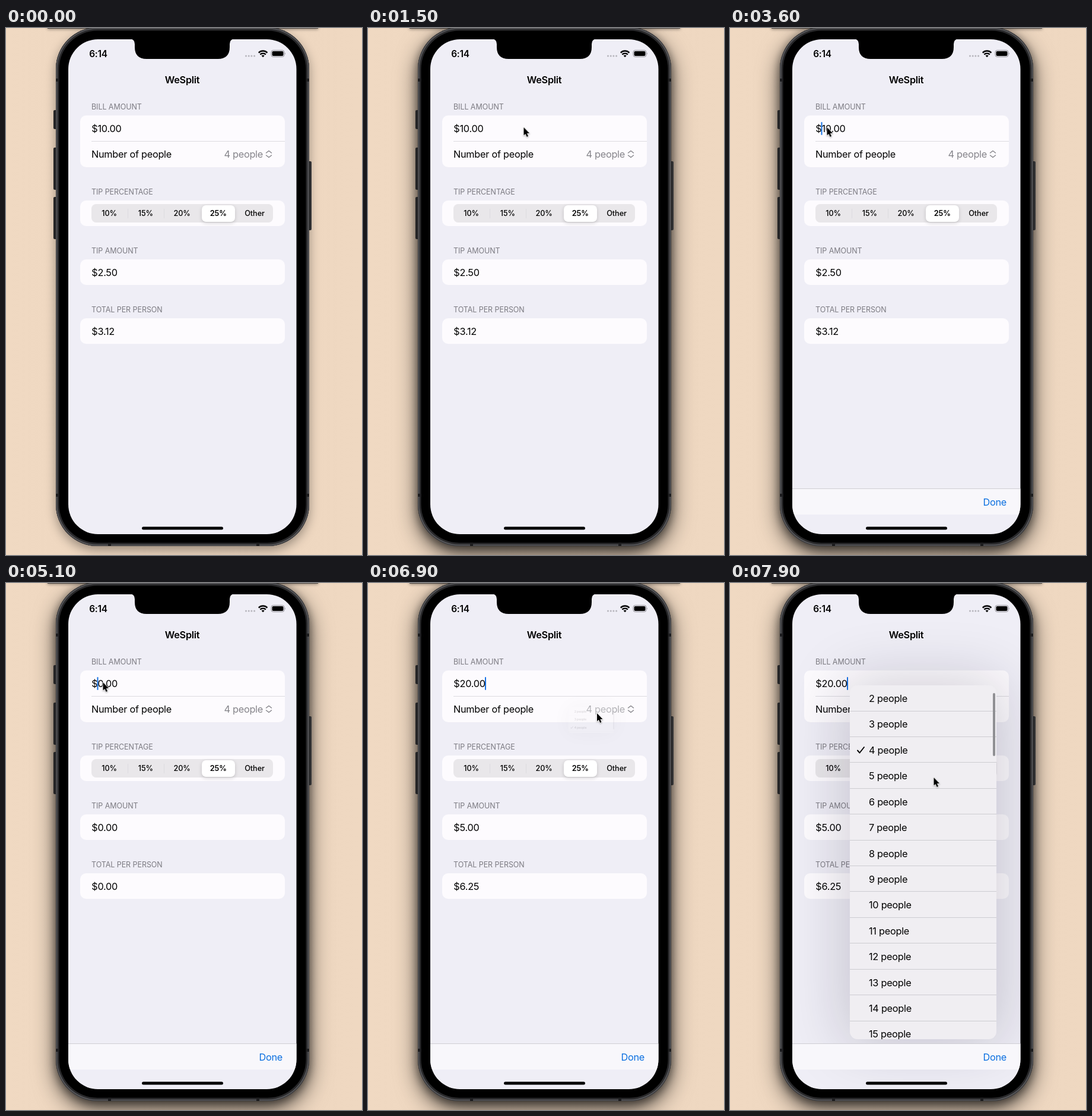
Animation, 600 px wide and 886 px high, one loop 8000 ms. Source, as an HTML page:

```html
<!DOCTYPE html>
<html lang="en">
<head>
<meta charset="utf-8">
<title>WeSplit</title>
<style>
  html, body { margin: 0; width: 100%; height: 100%; overflow: hidden; }
  #stage {
    position: relative; width: 600px; height: 886px; overflow: hidden;
    background: linear-gradient(90deg, #f0d9c2, #edd6bf 50%, #efd8c1);
    font-family: Inter, sans-serif; color: #000;
  }
  #stage div, #stage svg { position: absolute; box-sizing: border-box; }
  #stage .text { white-space: pre; line-height: 20px; letter-spacing: -.0165em; }
  .bar { background: #4e4a47; box-shadow: 0 1px 5px rgba(0, 0, 0, .45); }
  .shade { border-radius: 70px; }
  .soft { box-shadow: 0 7px 18px rgba(0, 0, 0, .36); }
  .deep { box-shadow: 0 14px 38px rgba(0, 0, 0, .6), 0 2px 14px rgba(0, 0, 0, .25); }
  .button { background: linear-gradient(90deg, #1c1c1d, #38383a); border-radius: 2px; }
  .frame {
    border-radius: 70px; background: #000;
    box-shadow: inset 0 0 0 1px #38383a, inset 0 0 0 2.5px #5b5b5e, inset 0 0 0 5.5px #29292b;
  }
  .antenna { background: #1d1d1f; }
  #screen { inset: 0; background: #efeef6; clip-path: inset(19px 110.5px 35px 105px round 50px); }
  .card { background: #fdfbfe; border-radius: 10px; }
  .line { background: #dcdbe0; }
  .segments { background: #e9e7ea; border-radius: 8px; }
  .picked { background: #fff; border-radius: 7px; box-shadow: 0 2px 6px rgba(0, 0, 0, .16), 0 1px 1px rgba(0, 0, 0, .06); }
  .caret { background: #1672e4; border-radius: 1px; }
  .menu {
    overflow: hidden; border-radius: 13px; background: #f0eef2; transform-origin: 0 0;
    box-shadow: 0 0 100px 10px rgba(20, 18, 45, .19);
  }
  .rule { background: #cdccd1; }
  .scroll { background: #909094; border-radius: 2px; }
  .toolbar { background: #f8f7fb; border-top: 1px solid #cfced4; }
</style>
</head>
<body>
<div id="stage">
  <div id="back" style="inset:0"></div>
  <div id="screen"></div>
  <svg width="600" height="886" viewBox="0 0 600 886">
    <path d="M209 18H385Q377 19 377 27V32Q377 52 357 52H237Q217 52 217 32V27Q217 19 209 18Z"/>
    <g fill="#b6b5bc">
      <circle cx="404.500" cy="47" r="1.500"/><circle cx="409.200" cy="47" r="1.500"/>
      <circle cx="413.900" cy="47" r="1.500"/><circle cx="418.600" cy="47" r="1.500"/>
    </g>
    <g fill="none" stroke="#000" stroke-width="2.400">
      <path d="M425.800 41.600A10.200 10.200 0 0 1 440.400 41.600"/>
      <path d="M428.400 44.600A6.600 6.600 0 0 1 437.800 44.600"/>
    </g>
    <path d="M433.100 49.200L430.600 46.600A3.600 3.600 0 0 1 435.600 46.600Z"/>
    <rect x="447" y="37.500" width="22" height="11" rx="3.300" fill="none" stroke="#8f8e95"/>
    <rect x="448.500" y="39" width="19" height="8" rx="2"/>
    <path d="M470 41.300Q471.800 43 470 44.700Z" fill="#8f8e95"/>
    <rect x="229" y="838.500" width="137" height="5" rx="2.500"/>
  </svg>
  <svg id="cursor" width="16" height="22" viewBox="-2 -2 16 22" style="left:-2px;top:-2px;overflow:visible;filter:drop-shadow(0 1px 1px rgba(0,0,0,.3))">
    <path d="M0 0V13.600L3 10.900L5.200 15.900L7.500 14.900L5.400 10.100H9.600Z" stroke="#fff" stroke-width="1.600" paint-order="stroke" stroke-linejoin="round"/>
  </svg>
</div>
<script>
const LOOP = 8000;
const back = document.getElementById('back');
const screen = document.getElementById('screen');
const cursor = document.getElementById('cursor');

function box(parent, cls, x, y, w, h) {
  const el = document.createElement('div');
  el.className = cls;
  Object.assign(el.style, { left: x + 'px', top: y + 'px', width: w + 'px', height: h + 'px' });
  parent.append(el);
  return el;
}

// y is the middle of the capitals; align is 0, .5 or 1
function text(parent, str, x, y, { size = 16.3, align = 0, ...style } = {}) {
  const el = document.createElement('div');
  el.className = 'text';
  el.textContent = str;
  Object.assign(el.style, {
    left: x + 'px', top: y - 10 + 'px', fontSize: size + 'px', translate: -100 * align + '%', ...style
  });
  parent.append(el);
  return el;
}

function svg(parent, x, y, w, h, d, color, width) {
  parent.insertAdjacentHTML('beforeend',
    `<svg style="left:${x}px;top:${y}px" width="${w}" height="${h}" fill="none" stroke="${color}"
      stroke-width="${width}" stroke-linecap="round" stroke-linejoin="round"><path d="${d}"/></svg>`);
  return parent.lastElementChild;
}

// steps: [time, properties, easing to the next step]
function track(el, steps) {
  const frames = steps.map(([t, props, easing = 'linear']) => ({ ...props, easing, offset: t / LOOP }));
  if (frames[0].offset > 0) frames.unshift({ ...frames[0], offset: 0, easing: 'step-end' });
  if (frames.at(-1).offset < 1) frames.push({ ...frames.at(-1), offset: 1 });
  el.animate(frames, { duration: LOOP, iterations: Infinity });
}

const fade = (el, steps, easing) => track(el, steps.map(([t, opacity]) => [t, { opacity }, easing]));
const HOLD = 'step-end';
const FOCUS = 1500, TAP = 2090, ERASE = 4900, TYPE = 5500, OPEN = 6900;

// Device
box(back, 'bar', 70, -10, 456, 11);
box(back, 'shade soft', 84, -1, 427, 872);
fade(box(back, 'shade deep', 84, -1, 427, 872), [[0, 0], [FOCUS, 1]], HOLD);
for (const [x, y, h] of [[80, 138, 32], [80, 201, 71], [80, 284, 71], [509, 224, 116]])
  box(back, 'button', x, y, 5.5, h);
box(back, 'frame', 84, -1, 427, 872);
for (const y of [85, 783]) for (const x of [84, 505.5]) box(back, 'antenna', x, y, 5.5, 5);
box(back, 'antenna', 172, 865, 5, 5.5);
box(back, 'antenna', 422, 865, 5, 5.5);

// Form
text(screen, '6:14', 155.5, 43.5, { size: 15.4, align: .5, fontWeight: 600 });
text(screen, 'WeSplit', 297, 87, { align: .5, fontWeight: 600 });
for (const [title, y, h] of [
  ['BILL AMOUNT', 133, 86.5], ['TIP PERCENTAGE', 275.5, 43],
  ['TIP AMOUNT', 374.5, 43], ['TOTAL PER PERSON', 473.5, 43]
]) {
  text(screen, title, 144, y, { size: 12.5, color: '#7c7b82', letterSpacing: '-.005em' });
  box(screen, 'card', 124.5, y + 14, 345, h);
}
box(screen, 'line', 144, 189.5, 325.5, 1);
text(screen, 'Number of people', 144, 212);
const count = text(screen, '4 people', 433, 212, { align: 1, color: '#85848a' });
fade(count, [[0, 1], [6800, 1], [OPEN, .65], [7100, .4]]);
svg(screen, 437, 205, 12, 14, 'M1.500 5L6 1.500L10.500 5M1.500 9L6 12.500L10.500 9', '#85848a', 1.4);

box(screen, 'segments', 144, 296, 306, 31);
box(screen, 'line', 204.5, 303.5, 1, 16);
box(screen, 'line', 265.5, 303.5, 1, 16);
box(screen, 'picked', 330, 297.5, 56, 28);
['10%', '15%', '20%', '25%', 'Other'].forEach((label, i) =>
  text(screen, label, 174.2 + i * 61.2, 312, { size: 12.7, align: .5, fontWeight: i === 3 ? 600 : 500, letterSpacing: '-.005em' }));

for (const [y, ...values] of [
  [169, '$10.00', '$0.00', '$20.00'],
  [410.5, '$2.50', '$0.00', '$5.00'],
  [509.5, '$3.12', '$0.00', '$6.25']
]) values.forEach((value, i) =>
  fade(text(screen, value, 144.3, y), [0, ERASE, TYPE].map((t, k) => [t, +(k === i)]), HOLD));

const caret = box(screen, 'caret', 0, 158, 2, 21.5);
track(caret, [[0, 194.5], [3150, 153.5], [TYPE, 197]].map(([t, x]) => [t, { transform: `translateX(${x}px)` }, HOLD]));
const blinks = [2650, 3900, 5950, 7050].flatMap(t => [[t, 1], [t + 100, 0], [t + 450, 0], [t + 550, 1]]);
fade(caret, [[0, 0], [TAP - 1, 0], [TAP, 1], ...blinks]);

// Pop-up list
const menu = box(screen, 'menu', 201.5, 172, 247, 595);
for (let n = 2, y = 22; n <= 15; n++, y += 43.42) {
  text(menu, n + ' people', 32, y);
  box(menu, 'rule', 0, y + 20.5, 247, 1);
}
svg(menu, 11, 102, 16, 14, 'M2 7.500L5.500 11.500L13 2', '#000', 1.9);
box(menu, 'scroll', 241, 13, 3.5, 106);
const spring = 'cubic-bezier(.25,.8,.3,1)';
track(menu, [
  [0, { transform: 'translate(136.5px,37px) scale(.31)', height: '135px' }, HOLD],
  [OPEN, { transform: 'translate(136.5px,37px) scale(.31)', height: '135px' }, spring],
  [7400, { transform: 'none', height: '595px' }]
]);
fade(menu, [[0, 0], [OPEN - 1, 0], [OPEN, .16], [7130, 1]]);

const toolbar = box(screen, 'toolbar', 105, 774, 385, 44);
text(toolbar, 'Done', 361, 22, { align: 1, color: '#0a6fe0' });
track(toolbar, [
  [0, { transform: 'translateY(80px)' }, HOLD],
  [TAP, { transform: 'translateY(80px)' }, 'cubic-bezier(.215,.61,.355,1)'],
  [TAP + 500, { transform: 'none' }]
]);

// Pointer
track(cursor, [
  [0, 610, 250, HOLD], [1000, 600, 245, 'ease-out'], [1200, 262.5, 167],
  [1650, 262.5, 167, 'ease-in-out'], [2000, 163.5, 167],
  [5900, 163.5, 167, 'ease-in-out'], [6700, 386, 219],
  [7350, 386, 219, 'ease-in-out'], [7900, 343.5, 327]
].map(([t, x, y, ease]) => [t, { transform: `translate(${x}px,${y}px)` }, ease]));
</script>
</body>
</html>
```
